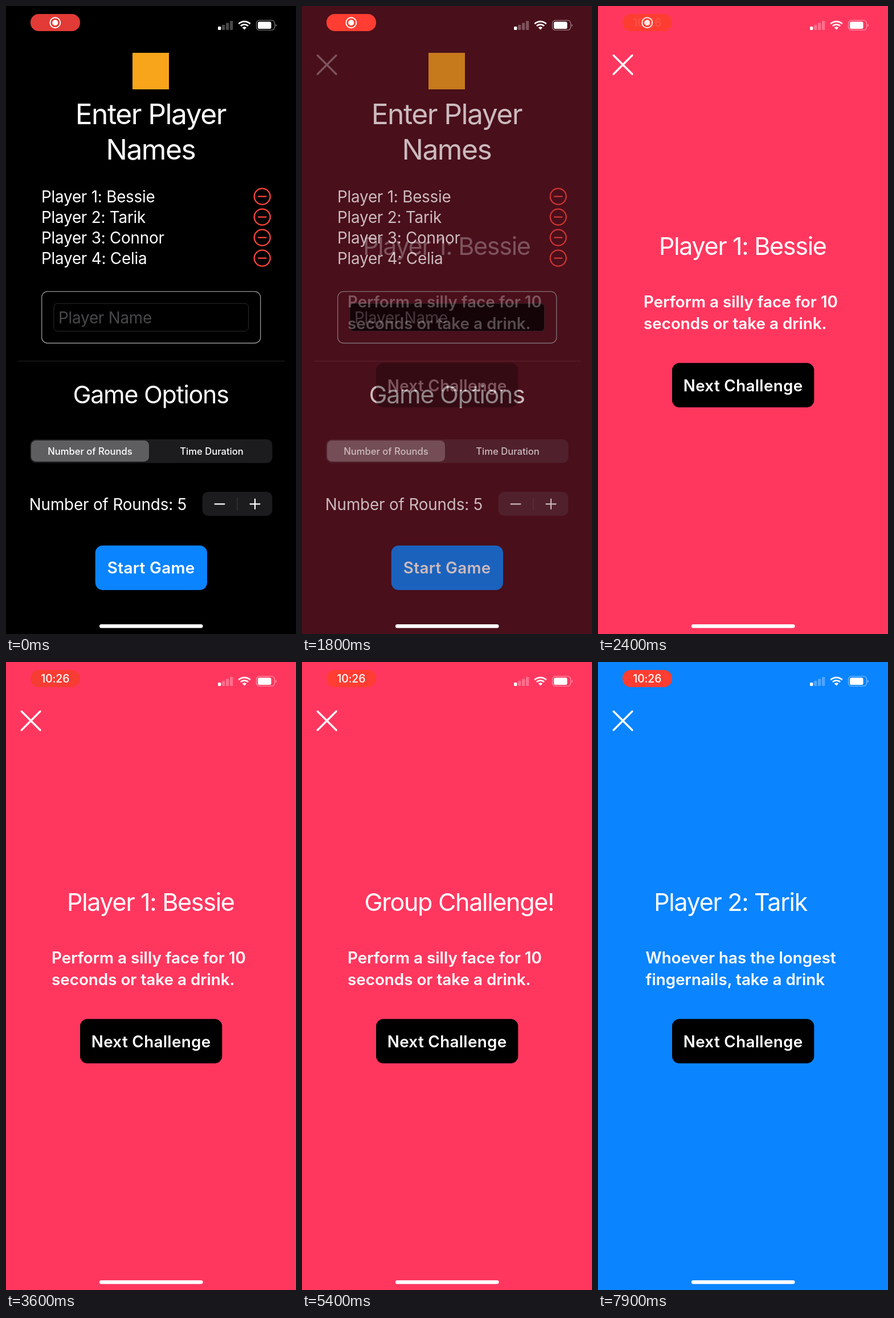
Animation of 509 by 1100 pixels, one loop 8 s. Source, as an HTML page:

```html
<!DOCTYPE html>
<html lang="en">
<head>
<meta charset="utf-8">
<title>Party game</title>
<style>
  html, body { margin: 0; width: 100%; height: 100%; overflow: hidden; background: #000; }
  svg { display: block; width: 100%; height: 100%; }
  text {
    font-family: Inter, Roboto, sans-serif; font-optical-sizing: none;
    font-size: 27.8px; letter-spacing: -.008em; fill: #fff; white-space: pre;
  }
  .mid { text-anchor: middle; }
  .head { font-size: 49.8px; letter-spacing: -.031em; }
  .title { font-size: 43px; letter-spacing: -.03em; }
  .bold { font-weight: 600; letter-spacing: 0; }
  .button { font-weight: 600; letter-spacing: .011em; }
  .seg { font-size: 16.6px; font-weight: 500; letter-spacing: 0; }
  .clock { font-size: 19.5px; font-weight: 500; }
  .line { fill: none; stroke: #fff; stroke-linecap: round; }
  .panel { fill: #767680; fill-opacity: .24; }
  .rule { stroke: #fff; stroke-opacity: .14; }
</style>
</head>
<body>
<svg viewBox="0 0 509 1100" preserveAspectRatio="none">
  <rect width="509" height="1100"/>
  <rect id="bg" width="509" height="1100"/>

  <g id="setup">
    <rect x="222" y="82" width="64" height="64" fill="#f9a51b"/>
    <text class="head mid" x="253.8" y="207">Enter Player</text>
    <text class="head mid" x="253.8" y="269">Names</text>
    <g id="players"></g>
    <rect x="62.7" y="500.2" width="384" height="90.3" rx="10" fill="none" stroke="#98989c" stroke-width="1.3"/>
    <rect x="84" y="521" width="341.5" height="48.5" rx="6.5" stroke="#2a2a2c"/>
    <text x="92" y="556" style="fill:#48484b">Player Name</text>
    <path class="rule" d="M21 622H489"/>
    <text class="title mid" x="254" y="696">Game Options</text>
    <rect class="panel" x="42" y="759" width="425.5" height="41.5" rx="10"/>
    <rect x="44" y="761" width="207" height="37" rx="8.5" fill="#fff" fill-opacity=".29"/>
    <text class="seg mid" x="147.5" y="785.5">Number of Rounds</text>
    <text class="seg mid" x="361" y="785.5">Time Duration</text>
    <text x="40.8" y="883" style="letter-spacing:-.005em">Number of Rounds: 5</text>
    <rect class="panel" x="344.7" y="851" width="122.6" height="42" rx="10"/>
    <path class="rule" d="M406 860.5V884"/>
    <path class="line" stroke-width="2.2" d="M366.5 872.3H383.5M428.5 872.3H445.5M437 863.8V880.8"/>
    <g id="start">
      <rect x="156.7" y="945" width="196.3" height="78" rx="13" fill="#0a84ff"/>
      <text class="button mid" x="254.7" y="994">Start Game</text>
    </g>
  </g>

  <g id="game">
    <path class="line" stroke-width="3.4" d="M27.3 86.5L60 119.2M60 86.5L27.3 119.2"/>
    <text id="title" class="title mid" y="436"></text>
    <g id="dare">
      <text class="bold" x="80" y="528">Perform a silly face for 10</text>
      <text class="bold" x="80" y="565.5">seconds or take a drink.</text>
    </g>
    <g id="group">
      <text class="bold" x="83.5" y="528">Whoever has the longest</text>
      <text class="bold" x="83.5" y="565.5">fingernails, take a drink</text>
    </g>
    <g id="next">
      <rect x="130" y="625.3" width="249.3" height="77.7" rx="13"/>
      <text class="button mid" x="254.6" y="674.5">Next Challenge</text>
    </g>
  </g>

  <g id="status">
    <rect id="pill" x="43" y="14" width="87" height="30" rx="14.5"/>
    <g id="rec">
      <circle class="line" cx="86.3" cy="29.2" r="9" stroke-width="1.9"/>
      <circle cx="86.3" cy="29.2" r="5" fill="#fff"/>
    </g>
    <text id="clock" class="clock mid" x="86.3" y="36">10:26</text>
    <g fill="#fff">
      <rect x="372" y="36" width="5.3" height="6" rx="1.2"/>
      <g opacity=".28">
        <rect x="379" y="33" width="5.3" height="9" rx="1.2"/>
        <rect x="386" y="29.5" width="5.3" height="12.5" rx="1.2"/>
        <rect x="393" y="26" width="5.3" height="16" rx="1.2"/>
      </g>
      <path d="M418.5 41.5L414.8 37.8A5.3 5.3 0 0 1 422.2 37.8Z"/>
      <rect x="442" y="27.6" width="23.5" height="12.4" rx="2.8"/>
      <path d="M473.2 31.2a3 3 0 0 1 0 5.4z" opacity=".45"/>
    </g>
    <path class="line" style="stroke-linecap:butt" stroke-width="2.8" d="M412 35.1A9.2 9.2 0 0 1 425 35.1M408.4 31.2A14.4 14.4 0 0 1 428.6 31.2"/>
    <rect class="line" x="439.5" y="25.2" width="32" height="17" rx="5" stroke-width="1.3" opacity=".45"/>
    <rect x="164" y="1083" width="181.5" height="6.6" rx="3.3" fill="#fff"/>
  </g>
</svg>
<script>
  const LOOP = 8000;
  const PINK = [255, 55, 95], BLUE = [10, 132, 255];
  const BRIGHT = [255, 61, 50], DIM = [226, 58, 54];
  const names = ['Bessie', 'Tarik', 'Connor', 'Celia'];
  const $ = id => document.getElementById(id);

  $('players').innerHTML = names.map((name, i) => {
    const y = 333.6 + 36 * i;
    return `<text x="62" y="${y + 10.4}">Player ${i + 1}: ${name}</text>
      <circle cx="449.7" cy="${y}" r="14" fill="none" stroke="#ff453a" stroke-width="2.3"/>
      <path d="M443 ${y}h13.4" stroke="#ff453a" stroke-width="2.3" stroke-linecap="round"/>`;
  }).join('');

  // Eased progress from 0 to 1 over [start, start + span].
  function ramp(t, start, span = 350) {
    const x = Math.min(1, Math.max(0, (t - start) / span));
    return x * x * (3 - 2 * x);
  }
  const mix = (a, b, k) => `rgb(${a.map((v, i) => Math.round(v + (b[i] - v) * k))})`;
  const fade = (id, k) => $(id).setAttribute('opacity', k);

  function press(id, cx, cy, t, down, up) {
    const s = 1 - .05 * (ramp(t, down, 180) - ramp(t, up, 130));
    $(id).setAttribute('transform', `translate(${cx} ${cy}) scale(${s}) translate(${-cx} ${-cy})`);
  }

  // Each new title starts at the previous one's left edge and glides to the centre.
  const titles = [
    { at: 0, text: `Player 1: ${names[0]}`, shift: 0 },
    { at: 5400, text: 'Group Challenge!', shift: 22 },
    { at: 7770, text: `Player 2: ${names[1]}`, shift: -31 }
  ];

  function draw(t) {
    const open = ramp(t, 1677);
    const turn = ramp(t, 5430);
    fade('bg', open);
    fade('setup', 1 - open);
    fade('game', open);
    $('bg').setAttribute('fill', mix(PINK, BLUE, turn));
    fade('dare', 1 - turn);
    fade('group', turn);

    const title = titles.filter(s => t >= s.at).pop();
    if ($('title').textContent !== title.text) $('title').textContent = title.text;
    $('title').setAttribute('x', 253.8 + title.shift * (1 - ramp(t, title.at)));

    press('start', 254.7, 984, t, 1330, 1560);
    press('next', 254.6, 664.2, t, 4980, 5270);
    if (t > 6400) press('next', 254.6, 664.2, t, 7370, 7630);

    const dim = Math.max(0, Math.cos(t / 3100 * 2 * Math.PI)) ** 2;
    $('pill').setAttribute('fill', mix(BRIGHT, DIM, dim));
    const clock = ramp(t, 2350, 250);
    fade('rec', 1 - clock);
    fade('clock', clock);
  }

  function tick() {
    draw(performance.now() % LOOP);
    requestAnimationFrame(tick);
  }
  tick();
</script>
</body>
</html>
```
